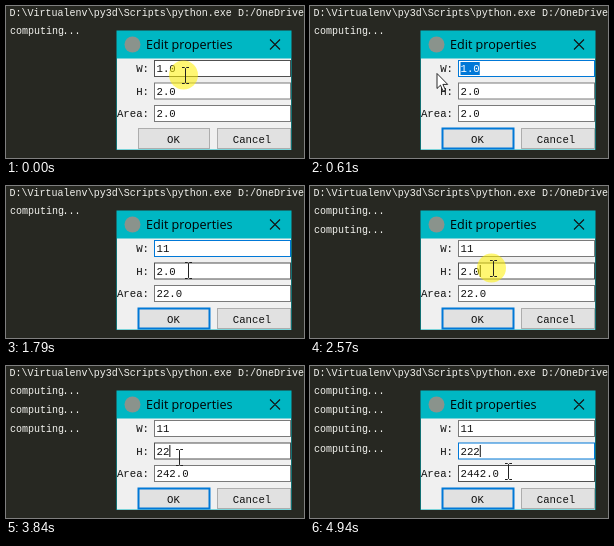
Animation of 298x152 px, one loop 5.02 s. Source, as an HTML page:

```html
<!DOCTYPE html>
<html lang="en">
<head>
<meta charset="utf-8">
<title>Edit properties</title>
<style>
html, body { margin: 0; width: 100%; height: 100%; overflow: hidden; background: #272822; }
svg { display: block; width: 298px; height: 152px; }
text { font-family: "Liberation Mono", monospace; font-size: 10.7px; fill: #111; white-space: pre; }
.log { font-size: 10.03px; fill: #f4f4f0; }
.title { font-family: "Open Sans", "Noto Sans", sans-serif; font-size: 12.6px; fill: #000; }
.label { text-anchor: end; }
.mid { text-anchor: middle; }
</style>
</head>
<body>
<svg viewBox="0 0 298 152">
  <rect width="298" height="152" fill="#272822"/>
  <text class="log" x="3.5" y="10">D:\Virtualenv\py3d\Scripts\python.exe D:/OneDrive</text>
  <g id="log"></g>

  <rect x="110.5" y="24.5" width="175" height="119.5" fill="#00b7c3"/>
  <rect x="111" y="52.5" width="174" height="91" fill="#f0f0f0"/>
  <circle cx="126.5" cy="38.5" r="8" fill="#8a938c"/>
  <text class="title" x="140" y="43">Edit properties</text>
  <path d="M264 33.5l10 10m0-10l-10 10" stroke="#111" stroke-width="1.1"/>

  <g id="fields"></g>

  <rect id="ok" x="132.5" y="122.5" width="71" height="20" fill="#e1e1e1"/>
  <text class="mid" x="167.5" y="136.5">OK</text>
  <rect x="211.5" y="122.5" width="73" height="20" fill="#e1e1e1" stroke="#adadad"/>
  <text class="mid" x="246" y="136.5">Cancel</text>

  <circle id="halo" cx="-1.5" r="14.5" fill="#fff000" fill-opacity=".55"/>
  <path id="beam" d="M-3-7.5h2.5l1 1 1-1h2.5M.5-6.5v14M-3 8.5h2.5l1-1 1 1h2.5" fill="none" stroke="#222"/>
  <path id="arrow" d="M0 0v15l3.5-3.3 2.6 6 2.4-1-2.6-5.8h4.8z" fill="#fff" stroke="#111" stroke-width=".9"/>
</svg>
<script>
const LOOP = 5020, LEFT = 150.5, PITCH = 6.42;
const BLUE = [0, 120, 215], GREY = [122, 122, 122], DARK = [80, 80, 80];
const $ = id => document.getElementById(id);

function add(parent, tag, attrs, text = "") {
  const el = document.createElementNS("http://www.w3.org/2000/svg", tag);
  set(el, attrs);
  el.textContent = text;
  parent.append(el);
  return el;
}
function set(el, attrs) {
  for (const k in attrs) el.setAttribute(k, attrs[k]);
}
const show = (el, on) => set(el, { visibility: on ? "visible" : "hidden" });

// Progress 0..1 in n equal jumps; the first at a, the last at b.
function steps(t, a, b, n) {
  if (t < a) return 0;
  if (t >= b || n < 2) return 1;
  return (Math.floor((t - a) / (b - a) * (n - 1) + 0.05) + 1) / n;
}
const mix = (a, b, k) => `rgb(${a.map((v, i) => Math.round(v + (b[i] - v) * k))})`;
const within = (t, a, b) => t >= a && t < b;
// Last value whose start time has passed.
const latest = (t, list) => list.filter(e => t >= e[0]).pop()[1];

// Moves: first jump, last jump, jumps, x, y
const moves = [
  [0, 0, 1, 179, 69],
  [90, 310, 4, 127, 70],
  [450, 530, 2, 127, 67.5],
  [840, 1320, 7, 181, 88],
  [1390, 1480, 2, 182, 89],
  [1620, 1790, 3, 182, 84],
  [2170, 2250, 2, 183, 82],
  [2640, 2800, 3, 142, 85],
  [2880, 2880, 1, 142, 83],
  [3050, 3120, 2, 159, 86],
  [3200, 3290, 2, 172, 90],
  [3440, 3530, 2, 173, 91],
  [4390, 4780, 6, 198, 105]
];
function pointer(t) {
  let x = 0, y = 0;
  for (const [a, b, n, tx, ty] of moves) {
    const k = steps(t, a, b, n);
    x += (tx - x) * k;
    y += (ty - y) * k;
  }
  return { x, y };
}

const lines = [0, 1940, 3840, 4220].map((at, i) => {
  const el = add($("log"), "text", { class: "log", x: 4, y: 28 + i * 19.2 }, "computing");
  add(el, "tspan", { dx: -1.5 }, "...");
  return { at, el };
});

function makeField(label, y) {
  const g = $("fields");
  add(g, "text", { class: "label", x: 143, y: y + 12 }, label);
  const box = add(g, "rect", { x: 148.5, y: y + .5, width: 136, height: 16, fill: "#fff" });
  const sel = add(g, "rect", { y: y + 2, height: 13, fill: mix(BLUE, BLUE, 0) });
  const text = add(g, "text", { x: LEFT, y: y + 12 });
  const plain = add(text, "tspan", {});
  const picked = add(text, "tspan", { fill: "#fff" });
  const caret = add(g, "rect", { y: y + 2.5, width: 1, height: 12, fill: "#111" });
  return { box, sel, plain, picked, caret };
}
const W = makeField("W:", 54), H = makeField("H:", 76.5), A = makeField("Area:", 99);

// from: index where the selection starts, reaching to the end of the value
function setField(f, value, focus, hover, caret = false, from = value.length) {
  set(f.box, { stroke: mix(focus ? BLUE : GREY, DARK, hover) });
  f.plain.textContent = value.slice(0, from);
  f.picked.textContent = value.slice(from);
  set(f.sel, { x: LEFT + from * PITCH, width: (value.length - from) * PITCH });
  set(f.caret, { x: LEFT + value.length * PITCH });
  show(f.caret, caret);
}

function draw(t) {
  const p = pointer(t);
  const dragged = Math.max(0, Math.min(3, Math.round((p.x - LEFT) / PITCH)));

  for (const l of lines) show(l.el, t >= l.at);

  setField(W, latest(t, [[0, "1.0"], [1240, "1"], [1620, "11"]]),
    within(t, 90, 2400),
    1 - steps(t, 450, 610, 3),
    within(t, 1240, 1790) || within(t, 2170, 2400),
    t < 90 || t >= 1240 ? undefined : t < 450 ? dragged : 0);

  setField(H, latest(t, [[0, "2.0"], [3050, "2"], [3670, "22"], [3990, "222"]]),
    t >= 2400,
    steps(t, 1240, 1480, 4) - steps(t, 2800, 2880, 2) + steps(t, 3050, 3290, 4) - steps(t, 4550, 4780, 4),
    within(t, 2400, 2640) || t >= 3050,
    within(t, 2640, 3050) ? (t < 2800 ? dragged : 0) : undefined);

  setField(A, latest(t, [[0, "2.0"], [1620, "22.0"], [3670, "242.0"], [3990, "2442.0"]]),
    false, steps(t, 4700, 4940, 4));

  const live = t >= 90;
  set($("ok"), { stroke: live ? mix(BLUE, BLUE, 0) : "#adadad", "stroke-width": live ? 2 : 1 });

  const arrow = within(t, 450, 1080) || within(t, 2880, 3120);
  const place = { transform: `translate(${p.x} ${p.y})` };
  for (const id of ["halo", "beam", "arrow"]) set($(id), place);
  show($("arrow"), arrow);
  show($("beam"), !arrow);
  show($("halo"), t < 450 || within(t, 2400, 2880));
}

const start = performance.now();
function tick() {
  draw((performance.now() - start) % LOOP);
  requestAnimationFrame(tick);
}
draw(0);
requestAnimationFrame(tick);
</script>
</body>
</html>
```
